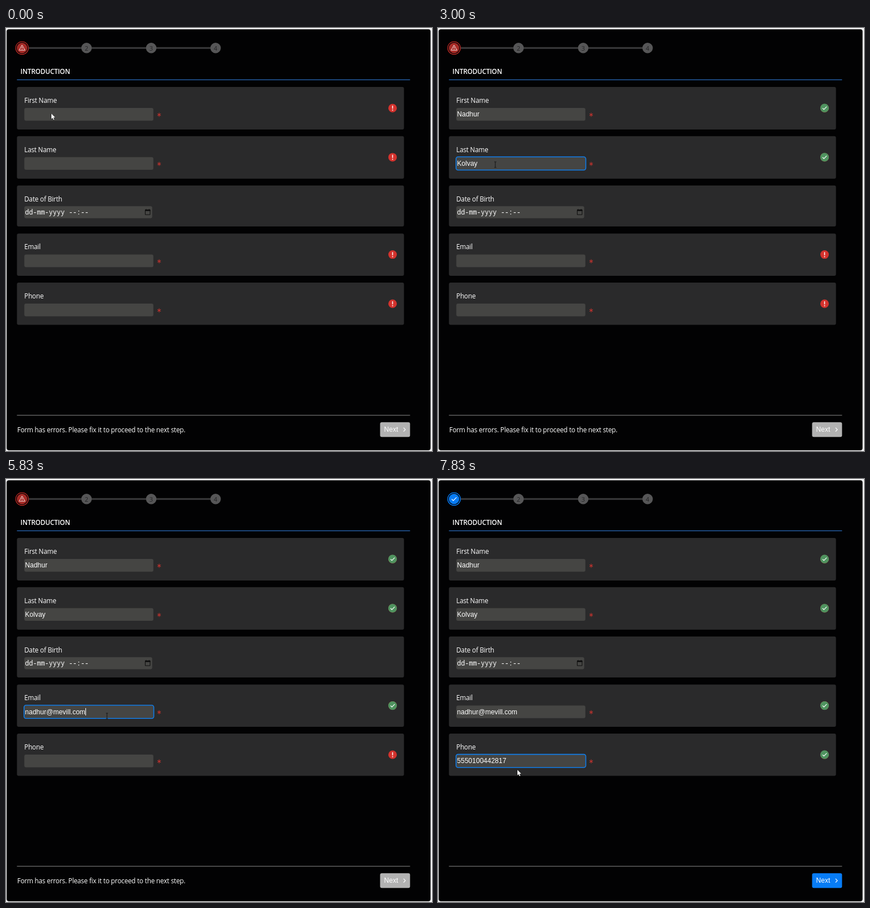
An HTML page with a canvas that plays this animation: 751x746 px, repeating every 8000 ms.

```html
<!DOCTYPE html>
<html lang="en">
<head>
<meta charset="utf-8">
<title>Form wizard</title>
<style>
html, body { margin: 0; width: 100%; height: 100%; overflow: hidden; background: #f3f3f4; }
canvas { display: block; }
</style>
</head>
<body>
<canvas id="stage" width="751" height="746"></canvas>
<script>
const ctx = document.getElementById('stage').getContext('2d');
const LOOP = 8000;
const UI = '"Open Sans", "Noto Sans", sans-serif';
const SANS = '"Liberation Sans", Arial, sans-serif';
const MONO = '"Noto Sans Mono", "DejaVu Sans Mono", monospace';
const RED = '#d3322d', GREEN = '#4f935f', BLUE = '#087cf5';
const FORM_VALID = 7600;

// typed: [start, end, number of characters added]
const fields = [
  { label: 'First Name', top: 104, h: 75, text: 'Nadhur', typed: [[860, 1260, 6]],
    focus: [330, 1830], valid: 940 },
  { label: 'Last Name', top: 190.7, h: 75, text: 'Kolvay', typed: [[2330, 2730, 6]],
    focus: [1830, 3540], valid: 2410 },
  { label: 'Date of Birth', top: 277.7, h: 72.3, date: true },
  { label: 'Email', top: 362.4, h: 74.6, text: 'nadhur@mevill.com',
    typed: [[4130, 4460, 6], [4730, 4731, 1], [4900, 5240, 6], [5300, 5400, 2], [5760, 5830, 2]],
    focus: [3540, 6360], valid: 5430 },
  { label: 'Phone', top: 449, h: 74.6, text: '5550100442817', typed: [[6960, 7160, 6], [7330, 7560, 7]],
    focus: [6360, LOOP], valid: 7530 }
];

const caretOn = [[330, 630], [860, 1530], [1860, 2160], [2330, 3000], [3560, 3860],
  [4130, 5600], [5760, 6100], [6380, 6760], [6960, 7700]];

const path = [[0, 80, 151], [300, 80, 151], [400, 95, 246], [1530, 95, 246], [1660, 100, 262],
  [1740, 100, 262], [1830, 101, 241], [3000, 101, 241], [3500, 178, 418], [6100, 178, 418],
  [6270, 113, 513], [6360, 113, 504], [7400, 113, 504], [7600, 140, 513], [LOOP, 140, 513]];

const within = (t, [a, b]) => t >= a && t < b;
const clamp = v => Math.max(0, Math.min(1, v));

function box(x, y, w, h, r, fill, stroke, lw = 1) {
  ctx.beginPath();
  ctx.roundRect(x, y, w, h, r);
  if (fill) { ctx.fillStyle = fill; ctx.fill(); }
  if (stroke) { ctx.strokeStyle = stroke; ctx.lineWidth = lw; ctx.stroke(); }
}

function disc(x, y, r, fill, stroke, lw = 1) {
  ctx.beginPath();
  ctx.arc(x, y, r, 0, Math.PI * 2);
  if (fill) { ctx.fillStyle = fill; ctx.fill(); }
  if (stroke) { ctx.strokeStyle = stroke; ctx.lineWidth = lw; ctx.stroke(); }
}

function line(points, color, lw, close) {
  ctx.beginPath();
  points.forEach(([x, y]) => ctx.lineTo(x, y));
  if (close) ctx.closePath();
  ctx.strokeStyle = color;
  ctx.lineWidth = lw;
  ctx.stroke();
}

function label(str, x, y, font, color = '#fff', spacing = 0, align = 'left') {
  ctx.font = font;
  ctx.letterSpacing = spacing + 'px';
  ctx.textAlign = align;
  ctx.fillStyle = color;
  ctx.fillText(str, x, y);
}

function check(x, y, s) {
  line([[x - 3.6 * s, y + 0.1 * s], [x - 1.2 * s, y + 2.5 * s], [x + 3.8 * s, y - 2.5 * s]], '#fff', 1.2);
}

function status(x, y, mix) {
  disc(x, y, 7.5, RED);
  line([[x, y - 4.3], [x, y + 1.2]], '#fff', 1.5);
  disc(x, y + 3.6, 0.95, '#fff');
  if (mix <= 0) return;
  ctx.globalAlpha = mix;
  disc(x, y, 7.6, GREEN);
  check(x, y, 1);
  ctx.globalAlpha = 1;
}

function asterisk(x, y) {
  for (let i = 0; i < 3; i++) {
    const a = Math.PI / 2 + i * Math.PI / 3, dx = 3.5 * Math.cos(a), dy = 3.5 * Math.sin(a);
    line([[x - dx, y - dy], [x + dx, y + dy]], '#d0342f', 1);
  }
}

function stepper(valid) {
  line([[28, 35.3], [369, 35.3]], '#3a3a3b', 3);
  [142, 256, 369.5].forEach((x, i) => {
    disc(x, 35.3, 9.2, '#565657');
    label(String(i + 2), x, 39.6, '11px ' + UI, '#242426', 0, 'center');
  });
  disc(28.3, 35.3, 11.8, '#020203');
  disc(28.3, 35.3, 11.2, null, valid ? BLUE : '#b32823', 1.3);
  disc(28.3, 35.3, 9.2, valid ? BLUE : '#a82b27');
  if (valid) return check(28.3, 35.3, 1.15);
  line([[28.3, 30], [33.5, 39.2], [23.1, 39.2]], '#f3dedd', 1, true);
  line([[28.3, 33.2], [28.3, 36.3]], '#f3dedd', 1);
  line([[28.3, 37.2], [28.3, 38.2]], '#f3dedd', 1);
}

function calendar(x, y) {
  ctx.fillStyle = '#111';
  ctx.fillRect(x, y + 1, 9.5, 2.6);
  ctx.fillRect(x + 1.5, y, 1.2, 2);
  ctx.fillRect(x + 6.8, y, 1.2, 2);
  box(x + 0.5, y + 1.5, 8.5, 8.5, 0.5, null, '#111', 1.1);
}

function typedCount(f, t) {
  return f.typed.reduce((sum, [a, b, n]) =>
    t < a ? sum : sum + Math.min(n, 1 + Math.floor((t - a) / (b - a) * (n - 1) + 1e-6)), 0);
}

function field(f, t) {
  const y = f.top;
  box(19.3, y, 682.3, f.h, 3, '#2a2a2b');
  label(f.label, 32.3, y + 28, '11.7px ' + UI, '#fff', -0.2);
  if (f.date) {
    box(32.3, y + 36.5, 225.4, 21.3, 3, '#454543');
    label('dd-mm-yyyy --:--', 33.5, y + 51.2, '500 11.7px ' + MONO);
    calendar(245, y + 41.6);
    return;
  }
  box(32.3, y + 37, 227.5, 22.4, 3, '#454543');
  if (within(t, f.focus)) box(31.8, y + 36.6, 228.7, 23.2, 3.5, null, '#127de8', 1.6);
  const value = f.text.slice(0, typedCount(f, t));
  label(value, 33.6, y + 52.2, '12px ' + SANS);
  if (within(t, f.focus) && caretOn.some(span => within(t, span))) {
    ctx.fillStyle = '#fff';
    ctx.fillRect(Math.round(33.6 + ctx.measureText(value).width), Math.round(y + 42), 1, 13);
  }
  asterisk(270, y + 49);
  status(681.5, y + 37.2, clamp((t - f.valid) / 90));
}

function footer(valid) {
  line([[19.3, 683], [712.3, 683]], '#8b8b8b', 1.2);
  if (!valid) {
    label('Form has errors. Please fix it to proceed to the next step.',
      19.8, 713, '11.7px ' + UI, '#fff', -0.2);
  }
  box(659.5, 695.3, 52.8, 26, 3, valid ? BLUE : '#b2b2b2');
  label('Next', 666.6, 712, '12px ' + SANS);
  line([[700.8, 704.8], [704, 708.2], [700.8, 711.6]], '#fff', 1.2);
}

function pointer(t) {
  const i = path.findIndex((p, k) => k > 0 && t < p[0]);
  const [t0, x0, y0] = path[i - 1], [t1, x1, y1] = path[i];
  const k = clamp((t - t0) / (t1 - t0)), e = k * k * (3 - 2 * k);
  const x = x0 + (x1 - x0) * e, y = y0 + (y1 - y0) * e;
  const overInput = fields.some(f => y > f.top + 37 && y < f.top + 59);
  if (t >= 300 && overInput) {
    line([[x, y - 5], [x, y + 5]], '#141414', 1);
    line([[x - 2, y - 5], [x + 2, y - 5]], '#141414', 0.8);
    line([[x - 2, y + 5], [x + 2, y + 5]], '#141414', 0.8);
    return;
  }
  ctx.beginPath();
  [[0, 0], [0, 9.6], [2.2, 7.6], [3.7, 11], [5.2, 10.3], [3.7, 7], [6.7, 6.8]]
    .forEach(([dx, dy]) => ctx.lineTo(x + dx, y + dy));
  ctx.closePath();
  ctx.strokeStyle = '#111';
  ctx.lineWidth = 1;
  ctx.stroke();
  ctx.fillStyle = '#fff';
  ctx.fill();
}

function draw(t) {
  const valid = t >= FORM_VALID;
  ctx.fillStyle = '#f3f3f4';
  ctx.fillRect(0, 0, 751, 746);
  box(1.2, 2.3, 747.3, 742.4, 4, '#020203');
  stepper(valid);
  label('INTRODUCTION', 25.6, 81, '600 11.7px ' + UI, '#fff', -0.16);
  line([[19.3, 91.4], [712.3, 91.4]], '#2868b8', 1.2);
  fields.forEach(f => field(f, t));
  footer(valid);
  pointer(t);
}

function tick() {
  draw(performance.now() % LOOP);
  requestAnimationFrame(tick);
}
tick();
</script>
</body>
</html>
```
